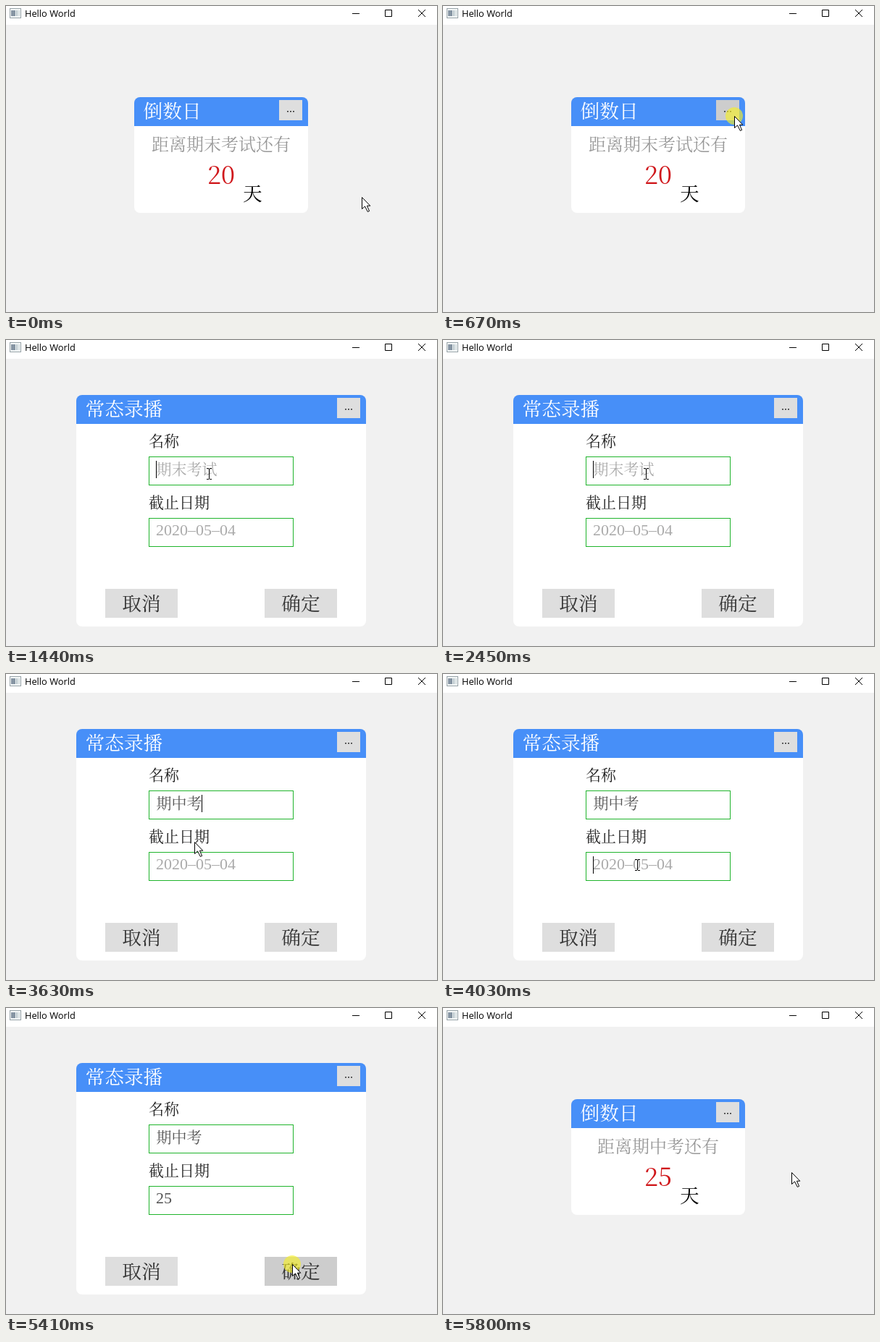
Animation, 595 px wide and 423 px high, one loop 6100 ms. Source, as an HTML page:

```html
<!DOCTYPE html>
<html lang="zh-CN">
<head>
<meta charset="utf-8">
<title>Hello World</title>
<style>
  html, body { margin: 0; width: 100%; height: 100%; overflow: hidden; background: #f1f1f1; }
  svg { display: block; width: 100vw; height: 100vh; cursor: default; }
  text { font-family: "Liberation Serif", "Noto Serif CJK SC", "Noto Sans CJK SC", serif; font-weight: 300; }
  .title { font: 12.8px "Open Sans", "Noto Sans", sans-serif; }
  .large { font-size: 26.67px; }
  .head { fill: #fff; font-weight: 200; }
  .notice { font-size: 24px; fill: #999; text-anchor: middle; }
  .count { font-family: "Noto Serif CJK SC", "Liberation Serif", serif; font-size: 34px; fill: #d0181c; text-anchor: middle; }
  .label { font-size: 21px; fill: #222; font-weight: 400; }
  .value { font-size: 21px; fill: #555; }
  .date { font-size: 22px; }
  .empty { fill: #aaa; }
  .action { fill: #333; text-anchor: middle; }
  .button { fill: #dedede; }
  .button.down { fill: #cdcdcd; }
  .field { fill: #fff; stroke: #1fb42c; }
  .line { fill: none; stroke: #000; }
</style>
</head>
<body>
<svg viewBox="0 0 595 423">
  <defs>
    <g id="dots" fill="#333">
      <rect x="11" y="15" width="2" height="1.5"/>
      <rect x="15" y="15" width="2" height="1.5"/>
      <rect x="19" y="15" width="2" height="1.5"/>
    </g>
  </defs>

  <rect width="595" height="423" fill="#f1f1f1"/>
  <rect width="595" height="26" fill="#fff"/>
  <g>
    <rect x="5.5" y="3.5" width="15" height="13" fill="#f4f7f7" stroke="#97a3a8"/>
    <rect x="7" y="6" width="6" height="8" fill="#8695a3"/>
    <rect x="14" y="6" width="2" height="8" fill="#b9c6cc"/>
    <rect x="17" y="6" width="2" height="8" fill="#d5dee0"/>
  </g>
  <text class="title" x="26" y="15">Hello World</text>
  <path class="line" d="M478 10.5h10M523.5 5.5h9v9h-9z"/>
  <path class="line" d="M569 5l10 10M579 5l-10 10"/>

  <g id="card">
    <path d="M177 166h240v112a8 8 0 0 1-8 8h-224a8 8 0 0 1-8-8z" fill="#fff"/>
    <path d="M177 166v-32a8 8 0 0 1 8-8h224a8 8 0 0 1 8 8v32z" fill="#478ff8"/>
    <text class="large head" x="189.6" y="155">倒数日</text>
    <rect id="menu" class="button" x="377" y="130" width="32" height="28"/>
    <use href="#dots" x="377" y="130"/>
    <text id="notice" class="notice" x="297" y="199.5"></text>
    <text id="count" class="count" x="297" y="245.5"></text>
    <text class="large" x="327" y="269">天</text>
  </g>

  <g id="dialog">
    <path d="M97 116h400v272a8 8 0 0 1-8 8h-384a8 8 0 0 1-8-8z" fill="#fff"/>
    <path d="M97 116v-32a8 8 0 0 1 8-8h384a8 8 0 0 1 8 8v32z" fill="#478ff8"/>
    <text class="large head" x="109.6" y="105">常态录播</text>
    <rect class="button" x="457" y="80" width="32" height="28"/>
    <use href="#dots" x="457" y="80"/>
    <text class="label" x="197" y="147">名称</text>
    <rect class="field" x="197.5" y="161.5" width="199" height="39"/>
    <text id="name" class="value" x="207.5" y="186"></text>
    <text class="label" x="197" y="232">截止日期</text>
    <rect class="field" x="197.5" y="246.5" width="199" height="39"/>
    <text id="date" class="value date" x="207" y="270"></text>
    <rect class="button" x="137" y="344" width="100" height="40"/>
    <text class="large action" x="187" y="374">取消</text>
    <rect id="confirm" class="button" x="357" y="344" width="100" height="40"/>
    <text class="large action" x="407" y="374">确定</text>
    <rect id="caret" width="1" height="24"/>
  </g>

  <g id="pointer">
    <circle id="glow" r="12" fill="#f5ee28" opacity=".65"/>
    <path id="arrow" fill="#fff" stroke="#000" d="M.5 .5V16.5L4.5 12.9L8.3 20.4L10.6 19.4L7.4 12.2H11.8Z"/>
    <path id="beam" class="line" d="M-3-7.5H0M1-7.5H4M.5-7V7M-3 7.5H0M1 7.5H4"/>
  </g>
</svg>
<script>
const LOOP = 6100;
const OPEN = 830, NAMED = 3320, DIGIT = 4340, DATED = 4490, CLOSE = 5490;

// first step, last step, step count, end x, end y
const moves = [
  [70, 520, 7, 402, 152],
  [910, 1290, 6, 280, 185],
  [3480, 3630, 3, 260, 232],
  [3710, 3860, 3, 268, 264],
  [4570, 4720, 3, 277, 267],
  [4800, 4950, 3, 333, 284],
  [5030, 5100, 2, 390, 340],
  [5180, 5260, 2, 395, 354],
  [5640, 5800, 3, 481, 227]
];
const presses = [[670, OPEN], [1290, 1360], [3950, 4030], [5410, CLOSE]];
// from, to, x, y
const carets = [
  [1360, 1900, 207, 167],
  [2450, 3000, 207, 167],
  [NAMED, 3870, 270, 167],
  [3950, DIGIT, 207, 252],
  [DIGIT, DATED, 218, 252],
  [DATED, 5040, 229, 252]
];

const el = id => document.getElementById(id);
const show = (id, on) => el(id).style.display = on ? "" : "none";
const during = t => ([from, to]) => t >= from && t < to;
const place = (id, x, y) => el(id).setAttribute("transform", `translate(${x} ${y})`);

function write(id, text, empty = false) {
  el(id).textContent = text;
  el(id).classList.toggle("empty", empty);
}

function pointerAt(t) {
  let x = 491, y = 264;
  for (const [from, to, steps, endX, endY] of moves) {
    if (t < from) break;
    const step = Math.floor((t - from) / (to - from) * (steps - 1)) + 1;
    const part = Math.min(1, step / steps);
    x += (endX - x) * part;
    y += (endY - y) * part;
  }
  return [Math.round(x), Math.round(y)];
}

function render(t) {
  const editing = t >= OPEN && t < CLOSE;
  const done = t >= CLOSE;
  show("card", !editing);
  show("dialog", editing);
  write("notice", done ? "距离期中考还有" : "距离期末考试还有");
  write("count", done ? "25" : "20");

  write("name", t < NAMED ? "期末考试" : "期中考", t < NAMED);
  write("date", t < DIGIT ? "2020–05–04" : t < DATED ? "2" : "25", t < DIGIT);
  const caret = carets.find(during(t));
  show("caret", caret);
  if (caret) place("caret", caret[2], caret[3]);

  const [x, y] = pointerAt(t);
  const pressed = presses.some(during(t));
  const inField = editing && x > 197 && x < 397 && (y > 161 && y < 201 || y > 246 && y < 286);
  place("pointer", x, y);
  show("glow", pressed);
  show("arrow", !inField);
  show("beam", inField);
  el("menu").classList.toggle("down", pressed && !editing);
  el("confirm").classList.toggle("down", pressed && y > 344);
}

function tick() {
  render(performance.now() % LOOP);
  requestAnimationFrame(tick);
}
tick();
</script>
</body>
</html>
```
